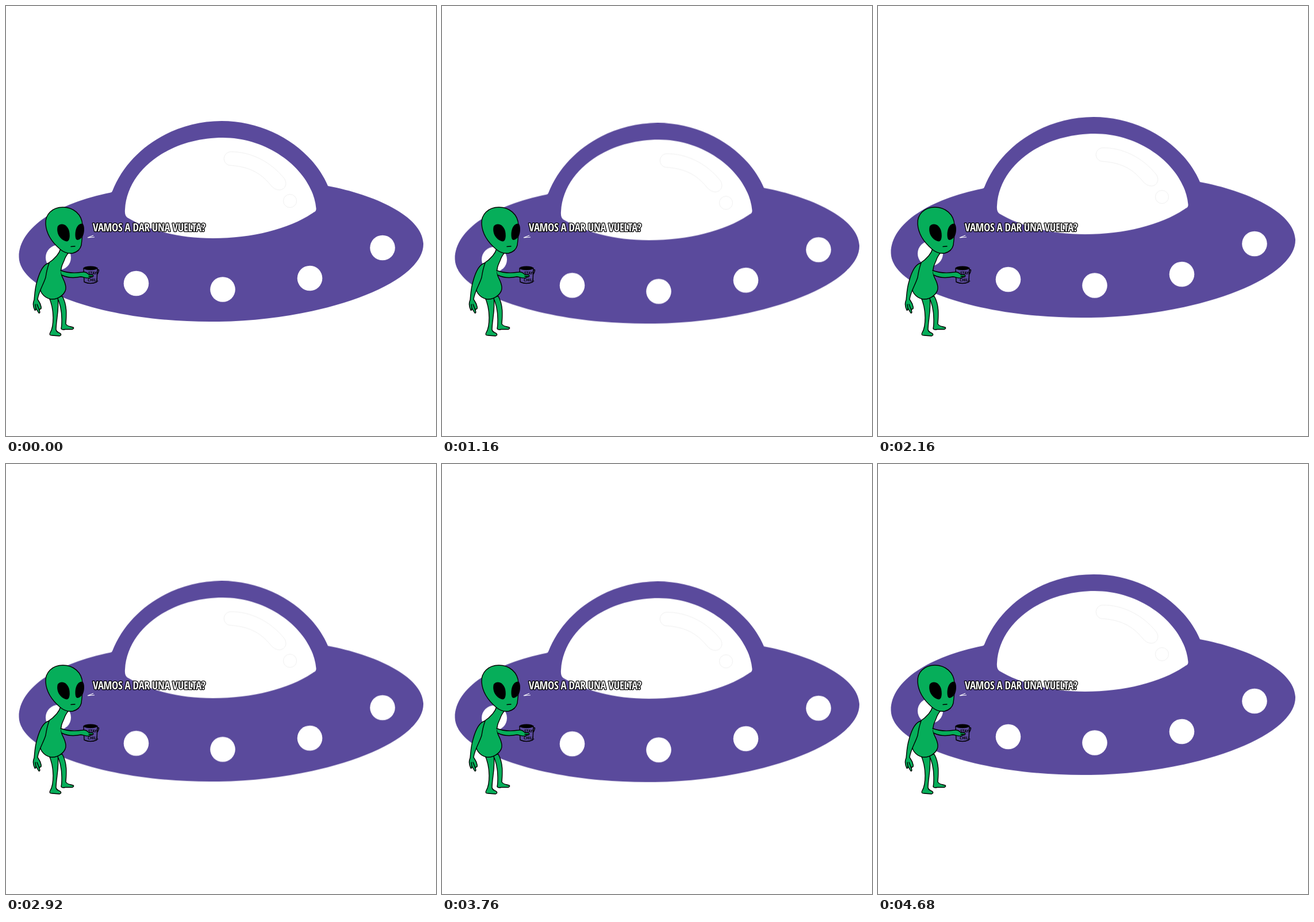
These frames come from a looping animation (748 px wide and 748 px high, 4.72 s). An HTML page:

```html
<!DOCTYPE html>
<html lang="es">
<head>
<meta charset="utf-8">
<title>Paseo en platillo</title>
<style>
  html, body { margin: 0; width: 100%; height: 100%; overflow: hidden; background: #fff; }
  svg { display: block; width: 100%; height: 100%; }
  .ship { fill: #5a4a9c; animation: hover 4720ms linear infinite; }
  .glass { fill: #fff; }
  .shine { fill: none; stroke: #f1f1f1; stroke-width: 1; }
  .alien { fill: #06ae5a; stroke: #000; stroke-width: 1.4; stroke-linejoin: round; stroke-linecap: round; }
  .ink { fill: #000; stroke: none; }
  .line { fill: none; }
  .mug { fill: #5a4a9c; }
  .label { font: 700 6.5px "Open Sans", sans-serif; fill: #000; stroke: none; }
  .speech {
    font: 800 14px "Open Sans Condensed", "Roboto Condensed", "Open Sans", sans-serif;
    font-stretch: 75%; letter-spacing: -.02em;
    fill: #f7f7f7; stroke: #000; stroke-width: 2.6; stroke-linejoin: round; paint-order: stroke;
  }
  .tail { fill: none; stroke: #fff; stroke-width: 1.1; }
  @keyframes hover {
    0% { transform: translateY(0); }
    15% { transform: translateY(9.5px); }
    43.25% { transform: translateY(-8.5px); }
    71.5% { transform: translateY(9.5px); }
    99.75%, 100% { transform: translateY(-8.5px); }
  }
</style>
</head>
<body>
<svg viewBox="0 0 748 748">
  <g class="ship">
    <path d="M182 324.500C90 343 22 385 22.500 437C24 500 190 552 370 549C560 546 728 480 726 413C724 365 640 328 560 313C532 248 458 200 375 200C290 200 213 250 185 322Q184 324 182 324.500Z"/>
    <path class="glass" d="M207 354C211 282 288 229 377 229C462 229 534 290 539.500 352Q540 357 535 359C495 387 430 404 360 404C300 404 248 390 211 368Q206 364 207 354Z"/>
    <g class="shine">
      <path d="M390 253.500C425 253 460 270 484 300C490 309 486 319 476 320Q467 320 460 311C441 288 420 279 388 277A12 12 0 0 1 390 253.500Z"/>
      <circle cx="494" cy="339" r="11.500"/>
    </g>
    <g class="glass">
      <circle cx="91" cy="437.500" r="22"/>
      <circle cx="226.500" cy="482.500" r="21.800"/>
      <circle cx="377" cy="493" r="21.800"/>
      <circle cx="528.500" cy="473.500" r="21.800"/>
      <circle cx="655" cy="420.500" r="21.800"/>
    </g>
  </g>

  <g class="alien">
    <!-- mug -->
    <path class="mug" d="M157 461Q163 456 161 462Q160 466 157 468"/>
    <path class="mug" d="M135 456L136 480Q147 485 158 480L159 456Z"/>
    <ellipse class="ink" cx="147" cy="456" rx="12" ry="3.500"/>
    <text class="label" x="143" y="467">STAY</text>
    <text class="label" x="142" y="478.500">CHILL</text>
    <!-- legs -->
    <path d="M88 505C95 518 97 532 97 545C97 552 97 557 96 561Q97 564 103 562.500L115 562.500Q119 561 117 559C112 557 107 558 104 553C105 540 107 521 98 505Z"/>
    <path d="M74 505C80 518 82 530 82 542C82 553 80 563 77 568Q74 573 80 573L93 574Q97 573 95 570C91 567 88 568 87 563C87 547 93 527 90 506Z"/>
    <!-- torso, neck -->
    <path d="M95 422C92 433 83 441 74 447C62 456 63 470 60 482C56 496 65 507 78 510C93 511 105 499 104 489C103 477 96 472 96 464C95 455 98 450 101 443C103 437 106 432 110 428Z"/>
    <!-- arms -->
    <path d="M95 460C108 465 120 465 133 463C138 462 141 464 144 467L151 468Q153 470 150 471L144 473C138 474 135 471 130 471C116 474 105 472 97 468"/>
    <path class="line" d="M144 470L151 471"/>
    <path d="M75 447C64 449 58 464 54 479C50 492 50 503 49 511C46 518 48 525 50 529Q52 530 52 526L57 534Q60 535 58 529L59 527Q62 528 61 523C60 516 56 513 55 510C57 496 65 485 69 472C70 465 71 458 75 447Z"/>
    <path class="line" d="M52 526L51 519M58 529L54 519"/>
    <!-- head -->
    <path d="M99 350C80 350 68 363 69 379C70 397 80 411 94 423C101 429 109 431 116 430C124 428 129 424 131 416C132 406 134 396 133 381C132 362 117 350 99 350Z"/>
    <path class="ink" d="M90 383C96 376 107 380 110 392C112 402 110 409 106 409.500C97 409 86 397 90 383Z"/>
    <path class="ink" d="M133 378.500C124 378 119 390 121 403C122 410 129 407 133 401C137 395 137 381 133 378.500Z"/>
    <path class="line" d="M113 418.500L120 418"/>
  </g>

  <path class="tail" d="M152 399L142 403L154 402"/>
  <text class="speech" x="151" y="392">VAMOS A DAR UNA VUELTA?</text>
</svg>
<script>
  // Choose the type size whose natural width fills the line.
  const speech = document.querySelector('.speech');
  speech.style.fontSize = 14 * 196 / speech.getComputedTextLength() + 'px';
</script>
</body>
</html>
```
